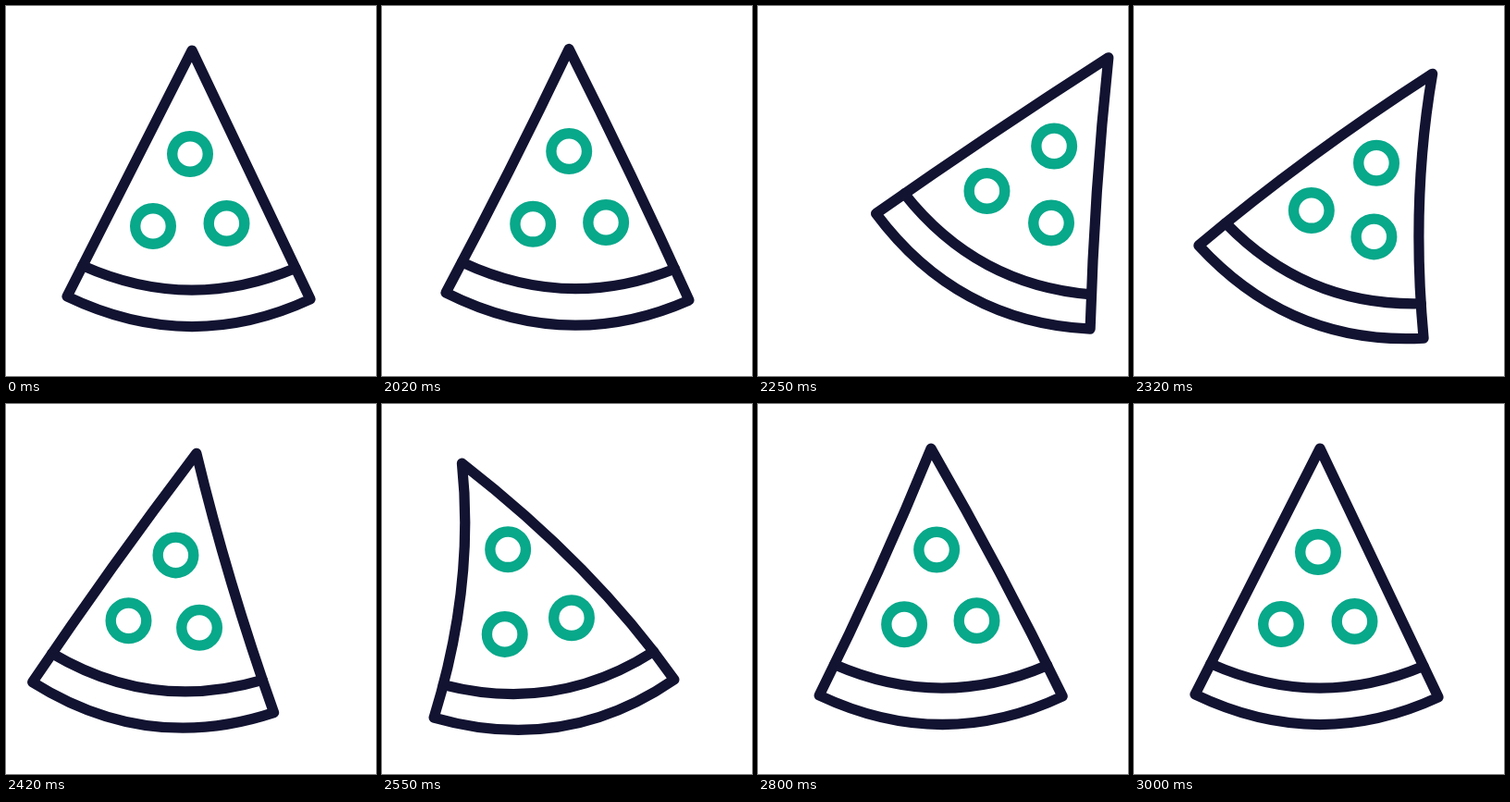
Recreate the animation shown at these times as an HTML page. Size 400x400 px, loop 3020 ms.

```html
<!DOCTYPE html>
<html lang="en">
<head>
<meta charset="utf-8">
<title>Pizza slice</title>
<style>
  html, body { margin: 0; width: 100%; height: 100%; overflow: hidden; background: #fff; }
  svg { display: block; width: 100%; height: 100%; fill: none; stroke-linecap: round; stroke-linejoin: round; }
  path { stroke: #121331; stroke-width: 11.2; }
  circle { stroke: #08a88a; stroke-width: 11.4; }
</style>
</head>
<body>
<svg viewBox="0 0 400 400">
  <circle r="19.3"/><circle r="19.3"/><circle r="19.3"/>
  <path id="outline"/>
  <path id="crust"/>
</svg>
<script>
const LOOP = 3020, START = 2020;

// time, crust centre x, y, tilt in degrees, sideways bend of the tip
const KEYS = [
  [0, 197.5, 315.5, 0, 0],
  [25, 200.5, 314, 1.1, -7],
  [125, 243, 290, 21.65, -38],
  [200, 261, 278, 29.35, -9],
  [325, 191.5, 309, 21.75, 31],
  [350, 177, 312.5, 18.6, 34],
  [420, 159, 317, 7.4, 15],
  [475, 168.5, 318.3, -2, -22],
  [525, 181, 319, -8.1, -52],
  [550, 186, 318.5, -9.65, -59],
  [675, 198.5, 315.5, -3.05, -40],
  [775, 197.8, 315.5, -0.7, -16],
  [875, 197.5, 315.5, 0, -4],
  [1000, 197.5, 315.5, 0, 0]
];

const rate = (i, c) => (KEYS[i + 1][c] - KEYS[i][c]) / (KEYS[i + 1][0] - KEYS[i][0]);

function slope(i, c) {
  if (i === 0 || i === KEYS.length - 1) return 0;
  const a = rate(i - 1, c), b = rate(i, c);
  return a * b > 0 ? 2 * a * b / (a + b) : 0;
}

// Smooth interpolation that never passes beyond its keys
function sample(t, c) {
  let i = 0;
  while (i < KEYS.length - 2 && t > KEYS[i + 1][0]) i++;
  const span = KEYS[i + 1][0] - KEYS[i][0];
  const u = Math.min(1, (t - KEYS[i][0]) / span), v = 1 - u;
  return v * v * (1 + 2 * u) * KEYS[i][c] + u * u * (3 - 2 * u) * KEYS[i + 1][c]
    + span * u * v * (v * slope(i, c) - u * slope(i + 1, c));
}

// Poses advance every 25 ms, held for 30 and 20 ms in turn
function poseTime(t) {
  if (t < START) return 0;
  const d = t - START;
  return 25 + 50 * Math.floor(d / 50) + (d % 50 >= 30 ? 25 : 0);
}

const outline = document.getElementById('outline');
const crust = document.getElementById('crust');
const rings = document.querySelectorAll('circle');

// Side of the slice as a quadratic curve: base, control, tip
function side(base, tip, bend, k) {
  return [base, [(base[0] + tip[0]) / 2 - bend * k / 2, (base[1] + tip[1]) / 2], tip];
}

function along([a, b, c], u) {
  const v = 1 - u;
  return [0, 1].map(n => v * v * a[n] + 2 * u * v * b[n] + u * u * c[n]);
}

function draw(t) {
  const [x, y, tilt, bend] = [1, 2, 3, 4].map(c => sample(t, c));
  const a = tilt * Math.PI / 180, cos = Math.cos(a), sin = Math.sin(a);
  const place = p => [x + p[0] * cos - p[1] * sin, y + p[0] * sin + p[1] * cos];
  const at = p => place(p).map(n => n.toFixed(2)).join(' ');

  const neg = Math.min(bend, 0), pos = Math.max(bend, 0);
  const tip = [3.5 + bend, -267.5];
  const left = side([-131.5, -1.5], tip, bend, pos ? 0.75 : 1);
  const right = side([131.5, 1.5], tip, bend, pos ? 1.3 : 1);
  const l = along(left, 0.125), r = along(right, 0.125);

  outline.setAttribute('d',
    `M${at(left[0])}Q${at(left[1])} ${at(tip)}Q${at(right[1])} ${at(right[0])}Q${at([1, 62])} ${at(left[0])}Z`);
  crust.setAttribute('d',
    `M${at(l)}Q${at([(l[0] + r[0]) / 2, (l[1] + r[1]) / 2 + 50])} ${at(r)}`);

  [
    [1.5 + 0.4 * bend, -155.5 + 0.2 * neg],
    [-38.5 + 0.04 * neg + 0.2 * pos, -77.5 - 0.14 * pos],
    [41 + 0.13 * neg, -80.5 + 0.04 * neg]
  ].forEach((p, i) => {
    const [cx, cy] = place(p);
    rings[i].setAttribute('cx', cx);
    rings[i].setAttribute('cy', cy);
  });
}

const begin = performance.now();
function tick() {
  draw(poseTime((performance.now() - begin) % LOOP));
  requestAnimationFrame(tick);
}
tick();
</script>
</body>
</html>
```
